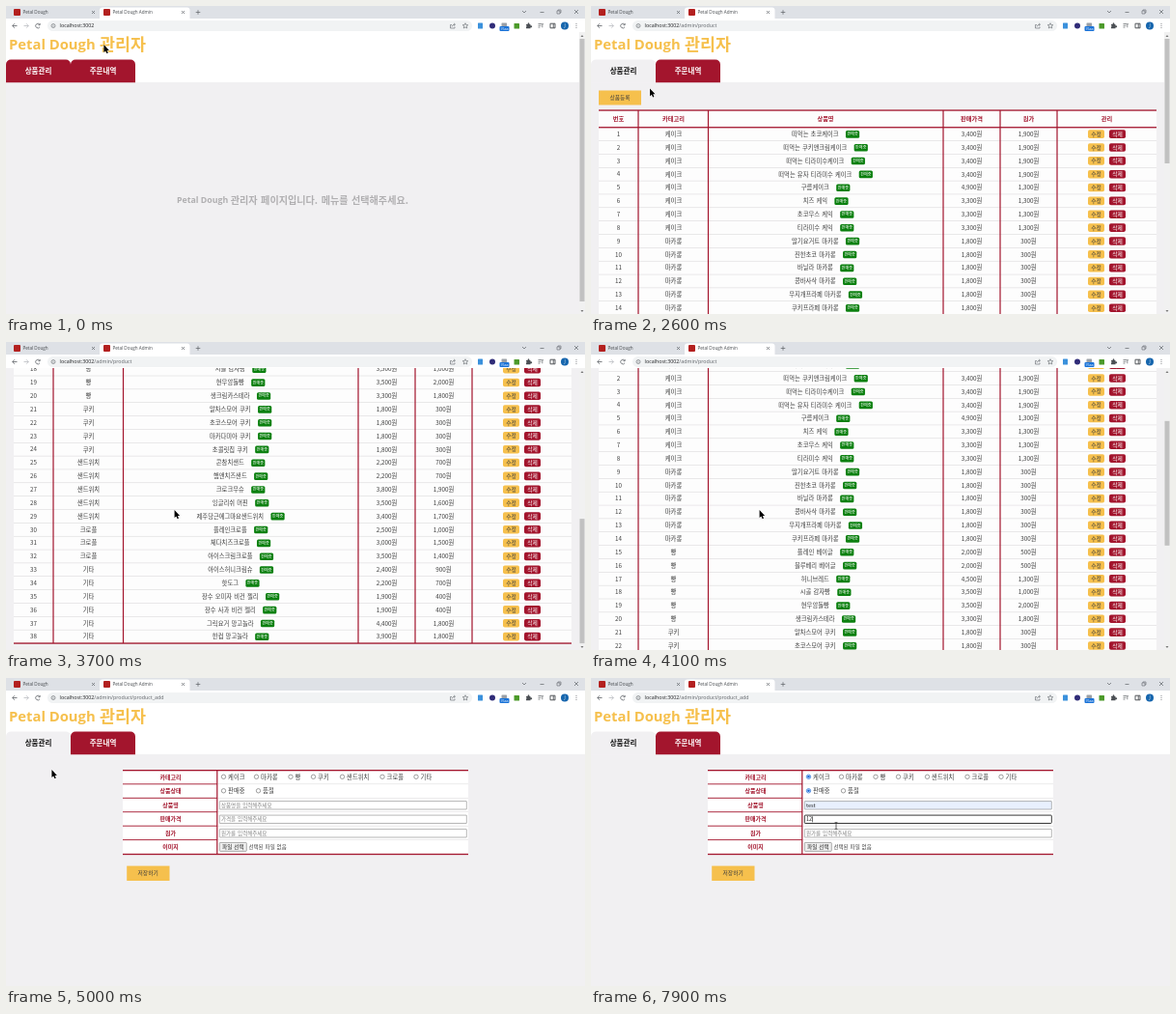
An HTML page with a canvas that plays this animation: 600x319 px, repeating every 8 s.

```html
<!DOCTYPE html>
<html lang="ko">
<head>
<meta charset="utf-8">
<style>
html, body { margin: 0; width: 100%; height: 100%; overflow: hidden; background: #fff; }
canvas { display: block; width: 600px; height: 319px; }
</style>
</head>
<body>
<canvas></canvas>
<script>
const canvas = document.querySelector('canvas'), g = canvas.getContext('2d');
const dpr = window.devicePixelRatio || 1;
canvas.width = 600 * dpr;
canvas.height = 319 * dpr;

const RED = '#a3152d', GOLD = '#f6c04d', PAGE = '#f1f0f2', INK = '#3c3c3c', ICON = '#5f6368';
const KR = '"Noto Sans CJK KR", "Noto Sans CJK", sans-serif', UI = '"Open Sans", sans-serif';
const SHOP = 'Petal Dough';

const groups = [
  ['케이크', '떠먹는 초코케이크/34/19,떠먹는 쿠키앤크림케이크/34/19,떠먹는 티라미수케이크/34/19,떠먹는 유자 티라미수 케이크/34/19,구름케이크/49/13,치즈 케익/33/13,초코무스 케익/33/13,티라미수 케익/33/13'],
  ['마카롱', '딸기요거트 마카롱/18/3,진한초코 마카롱/18/3,바닐라 마카롱/18/3,콩바사삭 마카롱/18/3,무지개프라페 마카롱/18/3,쿠키프라페 마카롱/18/3'],
  ['빵', '플레인 베이글/20/5,블루베리 베이글/20/5,허니브레드/45/13,시골 감자빵/35/10,현무암돌빵/35/20,생크림카스테라/33/18'],
  ['쿠키', '말차스모어 쿠키/18/3,초코스모어 쿠키/18/3,마카다미아 쿠키/18/3,초콜릿칩 쿠키/18/3'],
  ['샌드위치', '콘참치샌드/22/7,햄앤치즈샌드/22/7,크로크무슈/38/19,잉글리쉬 머핀/35/16,제주당근에그마요샌드위치/34/17'],
  ['크로플', '플레인크로플/25/10,체다치즈크로플/30/15,아이스크림크로플/35/14'],
  ['기타', '아이스허니크림슈/24/9,핫도그/22/7,장수 오미자 비건 젤리/19/4,장수 사과 비건 젤리/19/4,그릭요거 망고놀라/44/18,한컵 망고놀라/39/18']
];
const products = groups.flatMap(([kind, list]) =>
  list.split(',').map(item => [kind, ...item.split('/')]));

// Keyframes: time, then values
const pointer = [
  [0, 101.4, 40], [600, 130, 48], [700, 130, 48], [1400, 195.4, 61], [1600, 195.4, 61],
  [2100, 40, 69], [2500, 40, 69], [2900, 174.6, 174], [4300, 174.6, 174], [4800, 47.4, 95],
  [5200, 47.4, 95], [5700, 225, 103], [5800, 225, 103], [6100, 225, 118], [6200, 225, 118],
  [6500, 254, 133], [7000, 254, 133], [7200, 254, 158], [7400, 254, 153]
];
const scrolling = [[2800, 0], [3200, 233.5], [3300, 240], [3600, 340], [3700, 340], [4100, 109], [4300, 0]];

function at(keys, t) {
  const i = keys.findIndex(k => k[0] > t);
  if (i < 0) return keys.at(-1).slice(1);
  if (!i) return keys[0].slice(1);
  const a = keys[i - 1], b = keys[i], u = (t - a[0]) / (b[0] - a[0]), e = u * u * (3 - 2 * u);
  return a.slice(1).map((v, j) => v + (b[j + 1] - v) * e);
}

function rect(x, y, w, h, color) {
  g.fillStyle = color;
  g.fillRect(x, y, w, h);
}

function round(x, y, w, h, r, color, border) {
  g.beginPath();
  g.roundRect(x, y, w, h, r);
  if (color) { g.fillStyle = color; g.fill(); }
  if (border) { g.strokeStyle = border; g.stroke(); }
}

function disc(x, y, r, color, border) {
  round(x - r, y - r, 2 * r, 2 * r, r, color, border);
}

function path(d, x, y, stroke, fill, width = 0.7) {
  const p = new Path2D(d);
  g.save();
  g.translate(x, y);
  g.lineWidth = width;
  if (stroke) { g.strokeStyle = stroke; g.stroke(p); }
  if (fill) { g.fillStyle = fill; g.fill(p); }
  g.restore();
}

function setFont(size, weight = 400, font = KR) {
  g.font = `${weight} ${size}px ${font}`;
  g.wordSpacing = font === KR ? size * 0.12 + 'px' : '0px';
}

// y is the middle of the line
function text(s, x, y, size, color = INK, align = 'left', weight, font) {
  setFont(size, weight, font);
  g.textAlign = align;
  g.fillStyle = color;
  g.fillText(s, x, y + size * 0.37);
  return g.measureText(s).width;
}
const label = (s, x, y, size, color, weight) => text(s, x, y, size, color, 'center', weight);

function browser(url) {
  rect(0, 0, 600, 13, '#dee1e6');
  rect(0, 13, 600, 14, '#fff');
  round(97, 1.5, 93.5, 12, [3, 3, 0, 0], '#fff');
  [[8, SHOP], [101, SHOP + ' Admin']].forEach(([x, name]) => {
    round(x, 3, 7, 7, 1, '#b3201f');
    text(name, x + 9.5, 6.5, 4.6, '#45494d', 'left', 400, UI);
    path('M-1.5-1.5L1.5 1.5M1.5-1.5L-1.5 1.5', x + 82.5, 6.5, ICON);
  });
  path('M-2.3 0H2.3M0-2.3V2.3', 199, 6.5, ICON);
  path('M-2-1L0 1L2-1', 537, 6, ICON);
  path('M-2 0H2', 555.5, 6.5, ICON);
  path('M-2-1H1V2H-2ZM-1-1V-2H2V1H1', 573, 6, ICON, null, 0.6);
  path('M-2-2L2 2M2-2L-2 2', 591, 6, ICON);

  path('M2.5 0H-2.3M0-2.3L-2.3 0L0 2.3', 9, 20.5, ICON, null, 0.8);
  path('M-2.5 0H2.3M0-2.3L2.3 0L0 2.3', 21, 20.5, '#b9bcc0', null, 0.8);
  path('M2 1.2A2.3 2.3 0 1 1 1.8-1.4M2.2-2.5V-.8H.5', 33, 20.5, ICON, null, 0.8);
  round(43, 15, 440, 11, 5.5, '#f1f3f4');
  path('M-2 0A2 2 0 1 1 2 0A2 2 0 1 1-2 0M0-.3V1.1M0-1.1V-.7', 49, 20.5, ICON, null, 0.6);
  const w = text('localhost:3002', 55.6, 20.2, 5.3, '#202124', 'left', 400, UI);
  text(url, 55.6 + w, 20.2, 5.3, '#5f6368', 'left', 400, UI);
  path('M-1-1H-2.5V2.5H2V1M-1 1Q-.6-1.3 2.2-1.3M1-2.7L2.5-1.3L1 0', 463, 20.5, ICON, null, 0.6);
  path('M0-2.8L.8-.9L2.8-.8L1.2.5L1.8 2.5L0 1.4L-1.8 2.5L-1.2.5L-2.8-.8L-.8-.9Z', 476, 20.5, ICON, null, 0.6);
  round(489, 17.5, 5, 6, 0.5, '#3b91dc');
  disc(504, 20.5, 3, '#302c78');
  round(513.5, 17.5, 5.5, 4, 0.5, '#9ba1a8');
  round(511.5, 21, 10, 5, 1, '#1a73d8');
  text('76aa', 516.5, 23.4, 3.6, '#fff', 'center', 400, UI);
  round(526.5, 18, 5.5, 5.5, 0.5, '#4c9a2a');
  path('M-2.5-1.5H-.8A1 1 0 1 1 .8-1.5H2V0A1 1 0 1 1 2 1.5V2.7H-2.5V1.3A1 1 0 0 0-2.5-.4Z', 541.5, 20.5, null, '#4b4f54');
  path('M-2.5-2H1.5M-2.5-.2H.5M-2.5 1.6H-.5M1.8 1.8V-1.8H3', 554, 20.5, ICON);
  path('M-2.5-2.3H2.5V2.3H-2.5ZM.7-2.3V2.3', 566.5, 20.5, '#44484d', null, 0.9);
  disc(579, 20.5, 4, '#1565ad');
  text('J', 579, 20.4, 4.5, '#fff', 'center', 400, UI);
  [18.4, 20.5, 22.6].forEach(y => disc(591, y, 0.5, ICON));
}

function scrollbar(top, height) {
  rect(594, 27, 6, 292, '#f1f1f1');
  rect(594.5, top, 5, height, '#c1c1c1');
  path('M-1.5 1L0-1L1.5 1Z', 597, 31, null, '#777');
  path('M-1.5-1L0 1L1.5-1Z', 597, 316, null, '#777');
}

function header(inProducts) {
  rect(0, 27, 600, 52, '#fff');
  text(SHOP, 3, 39.5, 14.8, GOLD, 'left', 700, UI);
  text('관리자', 97, 39.5, 17.4, GOLD, 'left', 700);
  ['상품관리', '주문내역'].forEach((name, i) => {
    const open = inProducts && !i;
    round(i * 67, 55.6, 67, 23.6, [5, 5, 0, 0], open ? PAGE : RED);
    label(name, 33.5 + i * 67, 67.5, 7.5, open ? '#111' : '#fff', 700);
  });
}

function home() {
  header(false);
  text(SHOP, 177, 201, 8.8, '#b0afb1', 'left', 700, UI);
  text('관리자 페이지입니다. 메뉴를 선택해주세요.', 417, 201, 10.1, '#b0afb1', 'right', 700);
  scrollbar(34, 272);
}

function productList(scroll) {
  const ROW = 13.85, TOP = 125.7, won = n => (n * 100).toLocaleString('en-US') + '원';
  const bottom = TOP + products.length * ROW;
  g.save();
  g.translate(0, -scroll);
  header(true);
  rect(8, 87.5, 44, 15, GOLD);
  label('상품등록', 30, 95, 5.7);
  rect(8, 108, 578, bottom - 108, '#fdfdfd');
  const heads = ['번호', '카테고리', '상품명', '판매가격', '원가', '관리'];
  [28.5, 85.5, 243, 394.5, 453.5, 534.5].forEach((x, i) => label(heads[i], x, 117, 6.2, RED, 700));

  products.forEach(([kind, name, price, cost], i) => {
    const y = TOP + (i + 0.5) * ROW;
    if (y - scroll < 15 || y - scroll > 330) return;
    rect(8, y + ROW / 2 - 0.25, 578, 0.5, '#d4d2d4');
    label(i + 1, 28.5, y, 6.2);
    label(kind, 85.5, y, 6.3);
    setFont(6.3);
    const left = 243.3 - (g.measureText(name).width + 22) / 2;
    const end = left + text(name, left, y, 6.3);
    round(end + 7.4, y - 3.6, 14.2, 7.6, 1.5, '#0b800f');
    label('판매중', end + 14.5, y + 0.2, 4.1, '#fff');
    label(won(price), 394.5, y, 6.3);
    label(won(cost), 453.5, y, 6.3);
    round(515, y - 4.3, 17, 8.6, 1.8, GOLD);
    label('수정', 523.5, y, 5.8);
    round(537, y - 4.3, 17, 8.6, 1.8, RED);
    label('삭제', 545.5, y, 5.8, '#fff');
  });

  [49, 121.5, 365, 424, 483].forEach(x => rect(x - 0.6, 108, 1.2, bottom - 108, RED));
  [108, TOP, bottom].forEach(y => rect(8, y - 0.6, 578, 1.3, RED));
  g.restore();
  scrollbar(34 + scroll / 2.28, 129);
}

function radio(x, y, name, on) {
  g.lineWidth = 0.7;
  disc(x, y, 2.2, '#fff', on ? '#1668d9' : '#767676');
  if (on) disc(x, y, 1.3, '#1668d9');
  text(name, x + 4.6, y, 6.3);
}

function field(y, hint, value, focus, filled) {
  g.lineWidth = focus ? 0.9 : 0.6;
  round(221.3, y - 4.2, 256, 8.4, focus ? 0.8 : 0.3, filled ? '#e8f0fe' : '#fff', focus ? '#222' : '#858585');
  const w = text(value || hint, 223, y, 5.5, value ? '#222' : '#858585');
  if (focus) rect(223.3 + (value ? w : 0), y - 3, 0.6, 6, '#111');
}

function form(t) {
  const typed = (word, start, gap) => word.slice(0, Math.max(0, Math.floor((t - start) / gap) + 1));
  header(true);
  rect(121, 95, 358, 88, '#fff');
  ['카테고리', '상품상태', '상품명', '판매가격', '원가', '이미지'].forEach((name, i) => {
    const y = 102.6 + i * 14.45;
    label(name, 170.5, y, 6, RED, 700);
    if (i < 5) {
      rect(121, y + 6.8, 98, 0.9, RED);
      rect(219, y + 7, 260, 0.5, '#d8d6d8');
    }
  });
  rect(121, 95, 358, 1.3, RED);
  rect(121, 181.9, 358, 1.3, RED);
  rect(218.2, 95, 1.2, 88, RED);

  const kindX = [225.5, 259.5, 295, 318.5, 348.5, 390, 425];
  groups.forEach(([kind], i) => radio(kindX[i], 102.3, kind, !i && t >= 5800));
  radio(225.5, 116.8, '판매중', t >= 6100);
  radio(261.5, 116.8, '품절', false);
  field(131.8, '상품명을 입력해주세요', typed('test', 6600, 100), t >= 6500 && t < 7300, t >= 7000);
  field(146.3, '가격을 입력해주세요', typed('12', 7600, 200), t >= 7300);
  field(160.8, '원가를 입력해주세요');
  g.lineWidth = 0.6;
  round(221.3, 170.4, 28, 9, 0.8, '#efefef', '#767676');
  label('파일 선택', 235.3, 174.9, 5.6, '#222');
  text('선택된 파일 없음', 251.5, 174.9, 5.5);
  rect(125.2, 194.6, 44.3, 15.4, GOLD);
  label('저장하기', 147.2, 202.2, 5.8);
}

function draw(now) {
  const t = Math.floor(now % 8000 / 100) * 100;
  g.setTransform(dpr, 0, 0, dpr, 0, 0);
  rect(0, 0, 600, 319, PAGE);
  let url = '';
  if (t < 2200) {
    home();
  } else if (t < 4900) {
    url = '/admin/product';
    productList(at(scrolling, t)[0]);
  } else {
    url = '/admin/product/product_add';
    form(t);
  }
  browser(url);
  const [x, y] = at(pointer, t);
  if (t >= 6400) path('M-1.4-3.6Q0-3.6 0-2.8Q0-3.6 1.4-3.6M0-2.8V2.8M-1.4 3.6Q0 3.6 0 2.8Q0 3.6 1.4 3.6', x, y, '#222');
  else path('M0 0V8L1.8 6.4L3.1 9.2L4.4 8.6L3.2 5.9H5.5Z', x, y, '#fff', '#000', 0.8);
  requestAnimationFrame(() => draw(performance.now() - start));
}
const start = performance.now();
draw(0);
</script>
</body>
</html>
```
